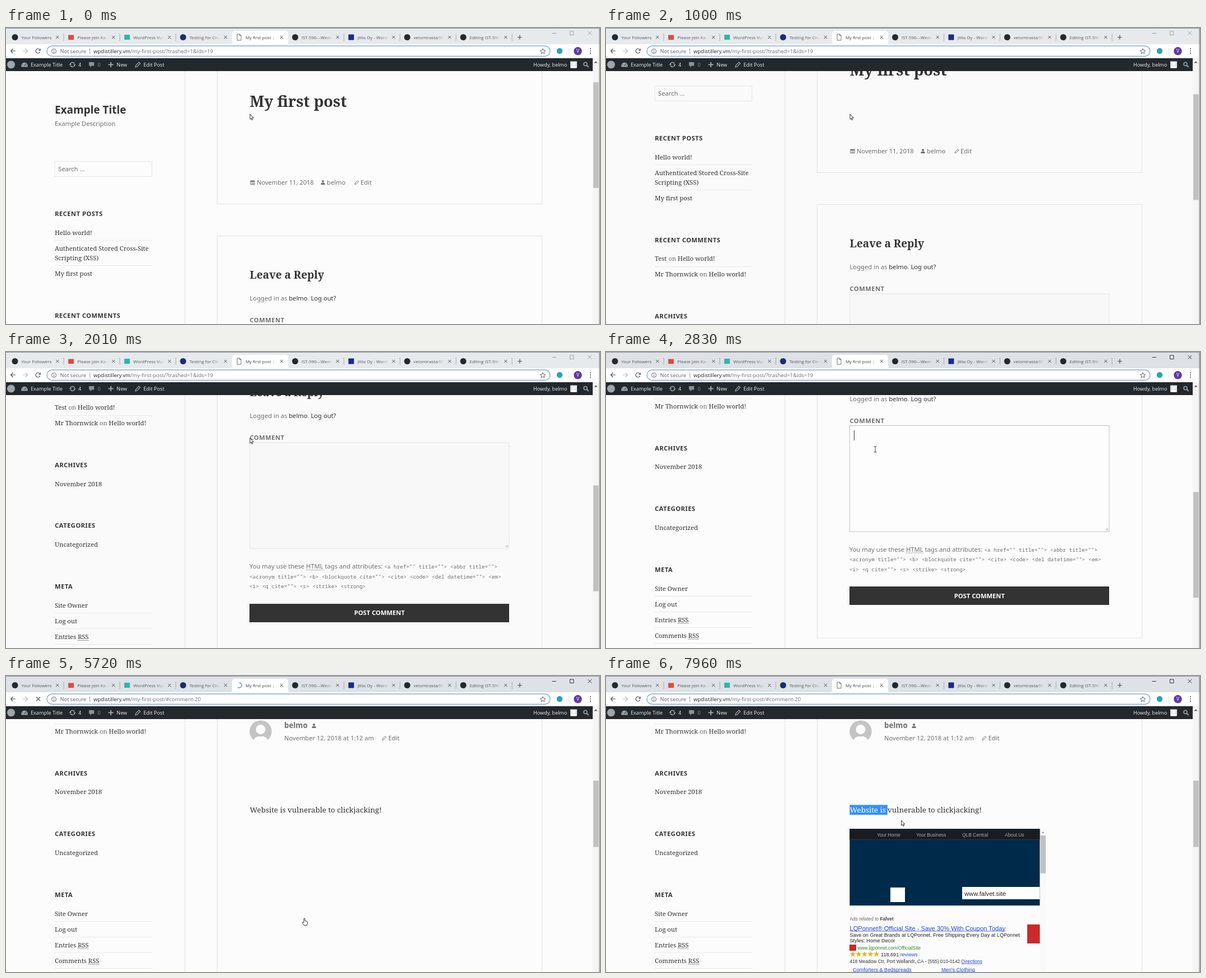
An HTML page with a canvas that plays this animation: 1059 px wide and 529 px high, repeating every 8000 ms.

```html
<!DOCTYPE html>
<html lang="en">
<head>
<meta charset="utf-8">
<title>My first post</title>
<style>
html, body { margin: 0; width: 100%; height: 100%; overflow: hidden; background: #fcfcfc; }
canvas { display: block; }
</style>
</head>
<body>
<canvas id="stage" width="1059" height="529"></canvas>
<script>
const c = document.getElementById("stage").getContext("2d");
const LOOP = 8000, TAU = Math.PI * 2;
const USER = "belmo";

const face = (family, generic) => (size, weight = 400) => `${weight} ${size}px "${family}", ${generic}`;
const sans = face("Noto Sans", "sans-serif");
const serif = face("Noto Serif", "serif");
const mono = face("Noto Sans Mono", "monospace");
const ui = face("Open Sans", "sans-serif");
const arial = face("Liberation Sans", "sans-serif");

const INK = "#333", SOFT = "#707070", BLUE = "#2447cf", ICON = "#a0a5aa";

// ---- drawing helpers ----
function rect(x, y, w, h, color) {
  c.fillStyle = color;
  c.fillRect(x, y, w, h);
}
function frame(x, y, w, h, color) {
  c.strokeStyle = color;
  c.lineWidth = 1;
  c.strokeRect(x, y, w, h);
}
function disc(x, y, r, color) {
  c.fillStyle = color;
  c.beginPath();
  c.arc(x, y, r, 0, TAU);
  c.fill();
}
function arc(x, y, r, from, to, color, width = 1) {
  c.strokeStyle = color;
  c.lineWidth = width;
  c.beginPath();
  c.arc(x, y, r, from, to);
  c.stroke();
}
function pen(x, y, d, stroke, width = 1, fill) {
  const path = new Path2D(d);
  c.save();
  c.translate(x, y);
  if (fill) { c.fillStyle = fill; c.fill(path); }
  if (stroke) { c.strokeStyle = stroke; c.lineWidth = width; c.stroke(path); }
  c.restore();
}
function text(s, x, y, font, color, spacing = 0) {
  c.font = font;
  c.fillStyle = color;
  c.letterSpacing = spacing + "px";
  c.fillText(s, x, y);
  const w = c.measureText(s).width;
  c.letterSpacing = "0px";
  return w;
}
function underline(x, y, w, kind, color) {
  c.strokeStyle = kind === "wave" ? "#e03030" : color;
  c.lineWidth = kind === "line" ? 0.8 : 1;
  c.beginPath();
  if (kind === "wave") {
    for (let i = 0; i <= w; i += 1.4) c.lineTo(x + i, y + 2.6 + (i / 1.4 % 2 < 1 ? -0.5 : 0.5));
  } else {
    if (kind === "dots") c.setLineDash([1, 1]);
    c.moveTo(x, y + (kind === "dots" ? 2.5 : 1.5));
    c.lineTo(x + w, y + (kind === "dots" ? 2.5 : 1.5));
  }
  c.stroke();
  c.setLineDash([]);
}
// parts: [string, color, underline kind, font]
function run(x, y, font, parts) {
  for (const [s, color, kind, own] of parts) {
    const w = text(s, x, y, own || font, color);
    if (kind) underline(x, y, w, kind, color);
    x += w;
  }
}
function clip(x, y, w, h, draw) {
  c.save();
  c.beginPath();
  c.rect(x, y, w, h);
  c.clip();
  draw();
  c.restore();
}

// ---- small icons ----
function person(x, y, color) {
  disc(x, y - 2, 2, color);
  pen(x, y, "M-3.6 4V2.5Q-3.6 0.4 0 0.4Q3.6 0.4 3.6 2.5V4Z", null, 0, color);
}
function pencil(x, y, color, k = 1) {
  c.save();
  c.translate(x, y);
  c.scale(k, k);
  pen(0, 0, "M-3.5 3.5L-2.8 1L1.6 -3.4L3.4 -1.6L-1 2.8Z", color, 1);
  c.restore();
}
function calendar(x, y) {
  frame(x - 3.5, y - 3, 7, 6.5, SOFT);
  rect(x - 3.5, y - 3, 7, 2, SOFT);
  pen(x, y, "M-2 1.3H2.5M-1 -0.5V3M1.2 -0.5V3", SOFT, 0.6);
}
function reload(x, y, r, color, w) {
  arc(x, y, r, 0.4, TAU - 0.9, color, w);
  pen(x, y, `M${r + 0.8} ${-r - 0.5}V-0.6H0.6Z`, null, 0, color);
}
const TRI_UP = "M-3 1.5L0 -1.5L3 1.5Z", TRI_DOWN = "M-3 -1.5L0 1.5L3 -1.5Z";

// ---- timing ----
const SCROLL = [[0, 79], [130, 35], [270, 0], [700, 24], [850, 85], [1000, 135], [1120, 167],
  [1270, 208], [1440, 255], [1590, 295], [1730, 336], [1880, 398], [2010, 448], [2140, 478.5]];
const MOUSE = [[0, 434.5, 153.5], [2410, 434.5, 153.5], [2690, 480, 174], [3910, 480, 174],
  [4330, 533, 424], [4460, 533.5, 428.5], [4850, 532, 432.5], [6200, 532, 432.5],
  [7110, 441.5, 235], [7270, 441.5, 235], [7420, 442, 235], [7959, 442, 235], [7960, 526, 257.5]];

const scrollAt = t => SCROLL.filter(k => k[0] <= t).pop()[1];
function mouseAt(t) {
  const i = MOUSE.findIndex(k => k[0] > t);
  if (i < 0) return MOUSE[MOUSE.length - 1].slice(1);
  const a = MOUSE[i - 1], b = MOUSE[i];
  let k = (t - a[0]) / (b[0] - a[0]);
  k = k * k * (3 - 2 * k);
  return [a[1] + (b[1] - a[1]) * k, a[2] + (b[2] - a[2]) * k];
}

// ---- browser window ----
const TABS = ["Your Followers", "Please join Kavo", "WordPress Vulnerab", "Testing for Clickj", "My first post | Ex",
  "IST-590---Week-10", "Jillia Oy - WordPr", "velomirasta/IST-59", "Editing IST-590--"];

function favicon(i, x, t) {
  if (i === 4) {
    if (t >= 5100 && t < 6620) arc(x, 16.5, 4.6, t / 160 + 0.3, t / 160 + 4.1, "#6b82c4", 1.4);
    else pen(x, 16.5, "M-3.5 -5.5H1L3.5 -3V5.5H-3.5ZM1 -5.5V-3H3.5", "#5f6368", 0.9, "#fff");
  } else if (i === 1) rect(x - 5, 12.5, 10, 8.5, "#dd4b3e");
  else if (i === 2) rect(x - 5, 12, 10, 9, "#2fb5a5");
  else if (i === 6) rect(x - 5, 11.5, 10, 10, "#1b2a86");
  else disc(x, 16.5, 5.5, i === 3 ? "#1d2f6b" : "#24292e");
}

function chrome(t) {
  const active = t >= 2550, secondPage = t >= 5500;
  rect(0, 0, 1059, 30, active ? "#dee1e6" : "#e7eaed");
  pen(0, 0, "M398 29.5Q403 29.5 403 25V10Q403 5 408 5H498Q503 5 503 10V25Q503 29.5 508 29.5Z", null, 0, "#fff");
  rect(0, 29, 1059, 25, "#fff");
  TABS.forEach((name, i) => {
    const x = 16 + i * 99.9, tx = x + 11.3, ink = i === 4 ? "60,64,67" : "84,88,93";
    favicon(i, x, t);
    const fade = c.createLinearGradient(tx + 42, 0, tx + 55, 0);
    fade.addColorStop(0, `rgb(${ink})`);
    fade.addColorStop(1, `rgba(${ink},0)`);
    c.font = ui(7.9);
    const fits = c.measureText(name).width < 57;
    clip(tx, 6, 57, 22, () => text(name, tx, 19.6, ui(7.9), fits ? `rgb(${ink})` : fade));
    pen(x + 75.7, 16.5, "M-2.6 -2.6L2.6 2.6M2.6 -2.6L-2.6 2.6", "#4a4d51", 1);
    if (i !== 3 && i !== 4) rect(x + 86.5, 10, 1, 13, "#a5a9ae");
  });
  pen(916, 16.5, "M-4 0H4M0 -4V4", "#4a4d51", 1.2);
  const ctl = active ? "#222" : "#999";
  pen(0, 0, "M973.5 9.5H981M1005.5 6H1012V12.5H1005.5ZM1037.5 6L1044 12.5M1044 6L1037.5 12.5", ctl, 0.9);

  pen(12.5, 41, "M4.5 0H-4M0 -4L-4 0L0 4", "#505357", 1.2);
  pen(34.5, 41, "M-4.5 0H4M0 -4L4 0L0 4", "#b9bcc0", 1.2);
  if (t >= 5100 && t < 6620) pen(57.5, 41, "M-3.6 -3.6L3.6 3.6M3.6 -3.6L-3.6 3.6", "#505357", 1.3);
  else reload(57, 41, 4, "#505357", 1.2);

  c.beginPath();
  c.roundRect(73, 32, 897, 18.5, 9.2);
  c.fillStyle = "#fff";
  c.fill();
  c.strokeStyle = "#86a8dc";
  c.lineWidth = 1.4;
  c.stroke();
  const danger = t >= 3490 && !secondPage;
  if (danger) {
    pen(85.5, 41, "M0 -4.3L4.7 4H-4.7Z", null, 0, "#d93025");
    rect(85, 39, 1, 2.6, "#fff");
    rect(85, 42.4, 1, 1, "#fff");
  } else {
    arc(85.5, 41.3, 4, 0, TAU, "#5f6368");
    rect(85, 40.8, 1, 2.8, "#5f6368");
    rect(85, 39, 1, 1, "#5f6368");
  }
  text("Not secure", 96.5, 44.7, ui(9.2), danger ? "#d93025" : "#5f6368");
  rect(149, 36.5, 1, 10, "#9a9da1");
  run(156, 44.7, ui(9.45), [["wpdistillery.vm", "#202124"],
    [secondPage ? "/my-first-post/#comment-20" : "/my-first-post/?trashed=1&ids=19", "#6a6e73"]]);
  pen(957, 41.5, "M0 -4.8L1.4 -1.6L4.8 -1.3L2.2 1L3 4.4L0 2.6L-3 4.4L-2.2 1L-4.8 -1.3L-1.4 -1.6Z", "#505357", 0.9);
  disc(987, 41, 5.2, "#2ba3b5");
  rect(1003, 35, 1, 12, "#e0e2e5");
  disc(1019.5, 41.3, 7.2, "#5a3aa5");
  c.textAlign = "center";
  text("V", 1019.5, 44.4, ui(8.4), "#fff");
  c.textAlign = "left";
  for (const y of [37, 41, 45]) disc(1042, y, 1.1, "#505357");
}

function topBar() {
  rect(0, 54, 1046, 23, "#23282d");
  disc(9, 65.5, 7, ICON);
  const put = (s, x, color = "#eee") => text(s, x, 69, ui(9.15), color);
  pen(33, 66, "M-5.5 3.5A5.8 5.8 0 1 1 5.5 3.5Z", null, 0, ICON);
  pen(33, 66, "M0 2L2.6 -2.6M-4 0H-2.8M4 0.4H2.8", "#23282d", 1);
  put("Example Title", 44);
  arc(118.5, 65.5, 3.9, 3.5, 5.9, ICON, 1.6);
  arc(118.5, 65.5, 3.9, 0.4, 2.8, ICON, 1.6);
  pen(118.5, 65.5, "M1.4 -0.5H6.2L4 2.2ZM-1.4 0.5H-6.2L-4 -2.2Z", null, 0, ICON);
  put("4", 129);
  pen(152.5, 65, "M-4.6 -4H4.6V2.5H0.5L-2.2 5.5V2.5H-4.6Z", null, 0, "#8d9297");
  put("0", 163.5, "#8d9297");
  pen(187, 65.5, "M-4.5 0H4.5M0 -4.5V4.5", ICON, 2);
  put("New", 197);
  pencil(235, 65.5, ICON, 1.25);
  put("Edit Post", 245);
  put("Howdy, " + USER, 940);
  rect(1006, 59.5, 12, 12, "#e3e3e3");
  disc(1012, 64, 2.5, "#fff");
  pen(1012, 65.5, "M-4.5 6Q-4.5 2 0 2Q4.5 2 4.5 6Z", null, 0, "#fff");
  arc(1033, 64.4, 3, 0, TAU, ICON, 1.5);
  pen(1033, 64.4, "M2.2 2.2L5.6 5.6", ICON, 1.8);
}

function pageBar(top, height, atTop) {
  rect(1046, 54, 12, 475, "#f5f5f5");
  pen(1051.5, 61, TRI_UP, null, 0, atTop ? "#b0b0b0" : "#505050");
  rect(1047, top, 9.5, height, "#c1c1c1");
}

// ---- page content ----
function sidebar(off) {
  const heading = (s, y) => text(s, 87, y - off, sans(11.2, 700), INK, 0.448);
  const item = (y, ...parts) => run(87, y - off, serif(11.2), parts.map(p => typeof p === "string" ? [p, INK] : p));
  const rule = y => rect(87, Math.round(y - off), 173, 1, "#eaeaea");
  text("Example Title", 87, 153 - off, sans(18.9, 700), INK);
  text("Example Description", 87, 175 - off, sans(11.2), SOFT);
  frame(87, 238.5 - off, 173, 27, "#e6e6e6");
  text("Search …", 93, 256 - off, sans(11.2), SOFT);
  heading("RECENT POSTS", 336);
  item(369.5, "Hello world!");
  item(397.5, "Authenticated Stored Cross-Site");
  item(414.5, "Scripting (XSS)");
  item(442.5, "My first post");
  heading("RECENT COMMENTS", 517.5);
  item(551, "Test", [" on ", SOFT], "Hello world!");
  item(579, "Mr Thornwick", [" on ", SOFT], "Hello world!");
  heading("ARCHIVES", 654);
  item(687.5, "November 2018");
  heading("CATEGORIES", 762);
  item(796, "Uncategorized");
  heading("META", 871);
  item(905, "Site Owner");
  item(933, "Log out");
  item(961, "Entries ", ["RSS", INK, "dots"]);
  item(989, "Comments ", ["RSS", INK, "dots"]);
  [379, 424, 561, 914, 942, 970, 998].forEach(rule);
}

const CODE = [
  [452.9, "<head>"],
  [459.8, "<title>~Clickjack~ test page</title>"],
  [452.9, "</head>"],
  [452.9, "<body>"],
  [459.8, "<p>Website is vulnerable to ~clickjacking~!</p>"],
  [459.8, "<~iframe~ ~src~=\"~http~://~www.falvet.site~\" width=\"500\" height=\"500\">"],
  [442.5, "</~iframe~>"],
  [452.9, "</body>"],
  [442.5, "</html>"]
];

function codeBox(t) {
  clip(435, 132, 450.5, 188, () => CODE.forEach(([x, s], i) => run(x, 132 + i * 21.93, serif(13.3),
    s.split("~").map((p, k) => [p, INK, k % 2 ? "wave" : ""]))));
  rect(886, 132, 10.5, 188, "#f1f1f1");
  rect(886.5, 172, 9.5, 125, "#c1c1c1");
  pen(891, 138, TRI_UP, null, 0, "#505050");
  pen(891, 303, TRI_DOWN, null, 0, "#505050");
  rect(886, 309.5, 10.5, 10.5, "#dcdcdc");
  if (t < 3910 || (t >= 4330 && t < 4700)) rect(490.5, 294, 1, 17.5, INK);
}

function postPage(t, s) {
  const y = v => v - s;
  const focus = t >= 2690 && t < 4700;
  frame(376.5, y(133.5), 579, 260, "#e3e3e3");
  text("My first post", 434.5, y(220), serif(27.3, 700), INK);
  calendar(439.5, y(355));
  text("November 11, 2018", 447, y(359), sans(11.1), SOFT);
  person(565, y(355), SOFT);
  text(USER, 572, y(359), sans(11.2), SOFT);
  pencil(625.5, y(355), SOFT);
  text("Edit", 632, y(359), sans(11.2), SOFT);

  frame(376.5, y(450.5), 579, 539, "#e3e3e3");
  text("Leave a Reply", 434.5, y(526.5), serif(19, 700), INK);
  run(434.5, y(566), sans(11.2), [["Logged in as ", SOFT], [USER, INK], [". ", SOFT], ["Log out?", INK]]);
  text("COMMENT", 434.5, y(605), sans(11.2, 700), SOFT, 0.448);
  rect(434.5, y(610), 462.5, 189.5, focus ? "#fdfdfd" : "#f8f8f8");
  frame(434.5, y(610), 462.5, 189.5, focus ? "#c1c1c1" : "#e8e8e8");
  if (t >= 3490) codeBox(t);
  else if (t >= 2690 && t < 3200) rect(442, y(618.5), 1, 18, INK);
  pen(895, y(797), "M0 -4L-4 0M0 -1.5L-1.5 0", "#777", 0.8);

  const code = mono(9.35);
  run(434, y(835), sans(11.2), [["You may use these ", SOFT], ["HTML", SOFT, "dots"],
    [" tags and attributes: ", SOFT], ["<a href=\"\" title=\"\"> <abbr title=\"\">", SOFT, "", code]]);
  text("<acronym title=\"\"> <b> <blockquote cite=\"\"> <cite> <code> <del datetime=\"\"> <em>", 434, y(852.5), code, SOFT);
  text("<i> <q cite=\"\"> <s> <strike> <strong>", 434, y(870), code, SOFT);
  rect(434, Math.round(y(897.5)), 463, 33, t >= 4590 ? "#707070" : "#333");
  c.textAlign = "center";
  text("POST COMMENT", 665.8, y(918), sans(11.2, 700), "#fff");
  c.textAlign = "left";
}

function commentPage(t) {
  rect(376, 77, 1, 452, "#e3e3e3");
  rect(955, 77, 1, 452, "#e3e3e3");
  c.save();
  c.beginPath();
  c.arc(454, 99, 19.7, 0, TAU);
  c.clip();
  rect(434, 79, 40, 40, "#c4c4c4");
  disc(454, 95.5, 8.5, "#fff");
  pen(454, 119, "M-13 2V-2Q-12 -9 -5 -11H5Q12 -9 13 -2V2Z", null, 0, "#fff");
  c.restore();
  text(USER, 496, 93, sans(13.3, 700), SOFT);
  person(549, 89, SOFT);
  text("November 12, 2018 at 1:12 am", 496, 115, sans(11.15), SOFT);
  pencil(674.5, 111, SOFT);
  text("Edit", 681.5, 115, sans(11.2), SOFT);

  const picked = t >= 7960;
  if (picked) rect(434.4, 230.4, 67.4, 17.6, "#3390ff");
  run(434.5, 244, serif(13.3), [["Website is ", picked ? "#fff" : INK], ["vulnerable to clickjacking!", INK]]);
  if (t >= 6480) embed();
}

function embed() {
  const a = arial(9.1), small = arial(8.4);
  rect(434.4, 273.2, 339, 137, "#002a4a");
  rect(434.4, 273.2, 339, 19, "#191d22");
  rect(434.4, 292, 339, 1, "#23394c");
  [["Your Home", 483], ["Your Business", 553], ["QLB Central", 635], ["About Us", 711]]
    .forEach(([s, x]) => text(s, x, 286.5, small, "#a9adb0"));
  rect(507, 378, 26, 26, "#fff");
  rect(635, 377, 138.4, 22, "#fff");
  text("www.falvet.site", 639, 393, arial(11.2), "#222");
  rect(774, 273, 10, 256, "#f9f9f9");
  pen(779, 279.5, "M-2.2 1L0 -1.2L2.2 1Z", null, 0, "#777");
  rect(774.5, 285, 9.5, 67.5, "#c1c1c1");

  run(434.5, 437, small, [["Ads related to ", "#666"], ["Falvet", "#444", "", arial(8.4, 700)]]);
  run(434.5, 454.5, arial(11.1), [["LQPonnet® Official Site - Save 30% With Coupon Today", BLUE, "line"]]);
  text("Save on Great Brands at LQPonnet. Free Shipping Every Day at LQPonnet", 434.5, 466, a, "#222");
  text("Styles: Home Decor", 434.5, 476.3, a, "#222");
  rect(434, 480, 12, 11, "#c92a2a");
  text("www.lqponnet.com/OfficialSite", 448.5, 488.8, small, "#2b8a2b");
  for (let i = 0; i < 5; i++) {
    pen(440 + i * 10.5, 497, "M0 -5L1.4 -1.7L5 -1.4L2.2 1L3.1 4.5L0 2.6L-3.1 4.5L-2.2 1L-5 -1.4L-1.4 -1.7Z", null, 0, "#f2b01e");
  }
  run(490, 501.3, a, [["118,691 ", "#222"], ["reviews", BLUE]]);
  run(434.5, 512.8, small, [["418 Meadow Ctr, Port Wellandr, CA - (555) 010-0142 ", "#333"], ["Directions", BLUE, "line"]]);
  run(440, 527.5, a, [["Comforters & Bedspreads", BLUE, "line"]]);
  run(598, 527.5, a, [["Men's Clothing", BLUE, "line"]]);
  rect(751, 444, 22.5, 34, "#c92a2a");
}

function pointer(t) {
  const [x, y] = mouseAt(t);
  if ((t >= 2500 && t < 4330) || (t >= 6970 && t < 7960)) {
    pen(x, y, "M-2.5 -5H-0.7Q0 -5 0 -4.2Q0 -5 0.7 -5H2.5M0 -4.5V4.5M-2.5 5H-0.7Q0 5 0 4.2Q0 5 0.7 5H2.5", "#333", 0.9);
  } else if (t >= 4330 && t < 6200) {
    pen(x, y, "M-1 1Q0 -0.6 1 1V5L5 6.2Q5.8 6.8 5.5 8.4L4.6 13H-0.8L-3.8 8.4Q-3.8 6.6 -1 8Z", "#222", 0.9, "#fff");
  } else {
    pen(x, y, "M0.5 0.5V9.8L2.6 7.8L4 11L5.4 10.4L4 7.3H6.8Z", "#222", 0.9, "#fff");
  }
}

function draw(t) {
  const s = scrollAt(t), second = t >= 5500, moving = t >= 700 && t < 2410;
  rect(0, 0, 1059, 529, moving ? "#fafafa" : "#fcfcfc");
  clip(0, 77, 1046, 452, () => {
    rect(318.5, 77, 1, 452, "#e0e0e0");
    // the side column stays pinned until the page has reached its top
    sidebar(second ? 476.5 : t < 700 ? 0 : s);
    if (second) commentPage(t);
    else postPage(t, s);
  });
  chrome(t);
  topBar();
  if (second) pageBar(187, 118.5, false);
  else pageBar(66.5 + s * 0.384, 189, s === 0);
  rect(1057.5, 0, 1, 529, "#6a6a6a");
  rect(0, 0, 1059, 1, "#8f9296");
  pointer(t);
}

function tick() {
  draw(performance.now() % LOOP);
  requestAnimationFrame(tick);
}
tick();
</script>
</body>
</html>
```
